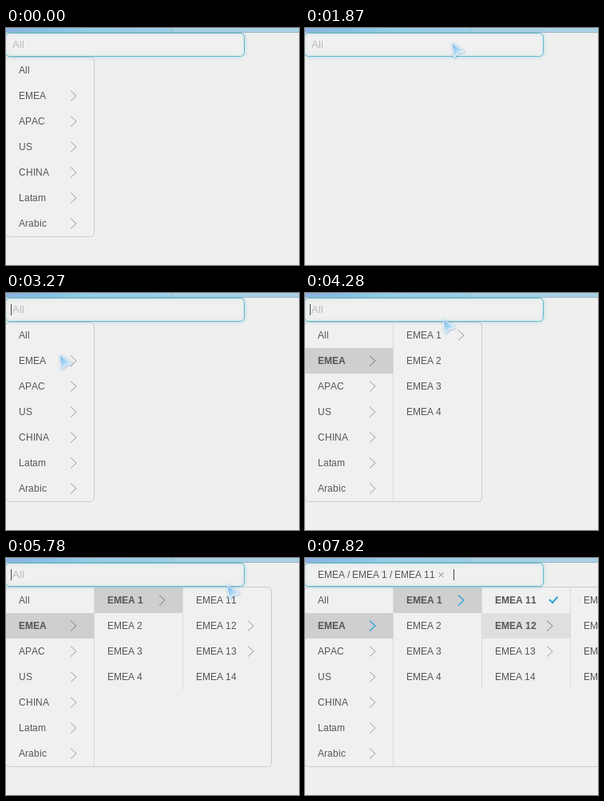
Write an HTML page with a canvas that moves like this. It is 367 px wide and 297 px high and loops after 8000 ms.

```html
<!DOCTYPE html>
<html lang="en">
<head>
<meta charset="utf-8">
<title>Cascading menu</title>
<style>
  html, body { margin: 0; width: 100%; height: 100%; overflow: hidden; background: #efefef; }
  canvas { display: block; }
</style>
</head>
<body>
<canvas id="stage" width="367" height="297"></canvas>
<script>
const ctx = document.getElementById('stage').getContext('2d');
const LOOP = 8000, COL = 111, ROW = 32, TOP = 37;
const FONT = '"Liberation Sans", Arial, sans-serif';
const BLUE = '#2ba3da';
const FOCUS = 940, CLOSE = 1400, REOPEN = 2480, SELECT = 6480;

// Labels ending in ">" open a further column.
const children = (parent, ...opening) =>
  [1, 2, 3, 4].map(n => parent + n + (opening.includes(n) ? '>' : ''));
const columns = [
  ['All', 'EMEA>', 'APAC>', 'US>', 'CHINA>', 'Latam>', 'Arabic>'],
  children('EMEA ', 1),
  children('EMEA 1', 2, 3),
  children('EMEA 12'),
];
const active = [
  { row: 1, at: 3400, color: '#cfcfcf' },
  { row: 0, at: 5400, color: '#cfcfcf' },
  { row: 1, at: 7400, color: '#dfdfdf' },
];

// Pointer stops: arrival time and tip position.
const stops = [
  [100, 325, 94], [840, 170, 28], [1390, 344, 150], [1870, 183, 18], [3230, 66, 77],
  [4180, 161, 38], [4280, 172, 32], [4680, 172, 53], [5760, 276, 33], [7180, 299, 96], [7800, 372, 108],
];

const ramp = (t, start, length) => Math.max(0, Math.min(1, (t - start) / length));
const ease = u => u * u * (3 - 2 * u);

function line(points, color, width = 1) {
  ctx.beginPath();
  points.forEach(([x, y]) => ctx.lineTo(x, y));
  ctx.strokeStyle = color;
  ctx.lineWidth = width;
  ctx.stroke();
}

// Glyphs sit on whole pixels.
function label(text, x, y, color = '#555', style = '12px') {
  ctx.font = `${style} ${FONT}`;
  ctx.fillStyle = color;
  for (const glyph of text) {
    ctx.fillText(glyph, x, y);
    x += Math.round(ctx.measureText(glyph).width);
  }
}

function box(x, y, w, h, stroke) {
  ctx.beginPath();
  ctx.roundRect(x, y, w, h, 5);
  ctx.fillStyle = '#f0f0f0';
  ctx.fill();
  ctx.strokeStyle = stroke;
  ctx.lineWidth = 1;
  ctx.stroke();
}

function drawBanner() {
  const sky = ctx.createLinearGradient(0, 0, 207, 0);
  ['#8fb2e2', '#88c0e5', '#96cfe9', '#9ccdea', '#a0d0ea']
    .forEach((color, i, all) => sky.addColorStop(i / (all.length - 1), color));
  ctx.fillStyle = sky;
  ctx.fillRect(0, 0, 207, 6);
  ctx.fillStyle = '#a9d1e6';
  ctx.fillRect(207, 0, 160, 6);
  ctx.fillStyle = '#9db4c2';
  ctx.fillRect(0, 5, 367, 1);
  ctx.fillRect(207, 0, 1, 6);
}

function drawColumn(items, index, t, hasNext) {
  const left = index * COL, current = active[index];
  const lit = current ? ramp(t, current.at, 200) : 0;
  const chosen = t >= SELECT;
  if (lit) {
    ctx.save();
    ctx.globalAlpha *= lit;
    ctx.fillStyle = current.color;
    ctx.fillRect(left, TOP + current.row * ROW, COL - 1, ROW);
    ctx.restore();
  }
  items.forEach((item, row) => {
    const y = TOP + row * ROW + 16;
    const isActive = lit > 0 && row === current.row;
    const isChosen = chosen && index === 2 && row === 0;
    label(item.replace('>', ''), left + 16, y + 4, '#555', isActive || isChosen ? 'bold 12px' : '12px');
    if (item.endsWith('>')) {
      const onPath = isActive && chosen && index < 2;
      line([[left + 81, y - 6.5], [left + 88, y], [left + 81, y + 6.5]],
        onPath ? BLUE : isActive ? '#777' : '#999', onPath ? 1.3 : 1);
    }
    if (isChosen) line([[left + 84, y - 1], [left + 88, y + 3], [left + 94.5, y - 4.5]], BLUE, 2);
  });
  if (hasNext) line([[left + 110.5, TOP], [left + 110.5, TOP + items.length * ROW]], '#d9d9d9');
}

function drawMenu(t) {
  const shown = t < REOPEN ? 1 - ramp(t, CLOSE, 250) : ramp(t, REOPEN, 250);
  if (!shown) return;
  const opened = 1 + active.filter(a => t > a.at).length;
  ctx.save();
  ctx.globalAlpha = shown;
  box(-.5, 36.5, opened * COL, 225, '#cbcbcb');
  for (let i = 0; i < opened; i++) {
    ctx.globalAlpha = shown * (i ? ramp(t, active[i - 1].at, 180) : 1);
    drawColumn(columns[i], i, t, i + 1 < opened);
  }
  ctx.restore();
}

function drawField(t) {
  const chosen = t >= SELECT;
  ctx.save();
  ctx.shadowColor = 'rgba(98,195,215,.45)';
  ctx.shadowBlur = 5;
  box(-.5, 6.5, 299, 29, '#62b7ca');
  ctx.restore();
  if (chosen) {
    label('EMEA / EMEA 1 / EMEA 11', 16, 25);
    line([[167.5, 18], [173.5, 24]], '#888');
    line([[173.5, 18], [167.5, 24]], '#888');
  } else {
    label('All', 8, 25, '#bbb', '13px');
  }
  const focused = t > REOPEN || (t > FOCUS && t < CLOSE);
  if (focused && (t + 620) % 1200 < 1000) {
    ctx.fillStyle = '#444';
    ctx.fillRect(chosen ? 186 : 6, 14, 1, 14);
  }
}

function pointerAt(t) {
  let [, x, y] = stops[0];
  for (const [arrival, nextX, nextY] of stops.slice(1)) {
    const glide = Math.min(320, 100 + 4 * Math.hypot(nextX - x, nextY - y));
    const u = ease(ramp(t, arrival - glide, glide));
    x += (nextX - x) * u;
    y += (nextY - y) * u;
    if (u < 1) break;
  }
  return [x, y];
}

function drawPointer(t) {
  if (t < stops[0][0]) return;
  ctx.save();
  ctx.translate(...pointerAt(t));
  const fill = ctx.createLinearGradient(1, 2, 12, 14);
  fill.addColorStop(0, '#72b5e8');
  fill.addColorStop(1, '#cdeafa');
  const shape = new Path2D('M1.5 1.5 L15.5 11.5 L8.5 12.5 L4 18 Z');
  ctx.lineJoin = 'round';
  ctx.shadowColor = 'rgba(60,120,180,.6)';
  ctx.shadowBlur = 3;
  ctx.shadowOffsetX = ctx.shadowOffsetY = .5;
  ctx.strokeStyle = '#eaf5fd';
  ctx.lineWidth = 2;
  ctx.stroke(shape);
  ctx.shadowColor = 'transparent';
  ctx.fillStyle = fill;
  ctx.fill(shape);
  ctx.restore();
}

function frame() {
  const t = performance.now() % LOOP;
  ctx.fillStyle = '#efefef';
  ctx.fillRect(0, 0, 367, 297);
  drawBanner();
  drawMenu(t);
  drawField(t);
  drawPointer(t);
  requestAnimationFrame(frame);
}
frame();
</script>
</body>
</html>
```
